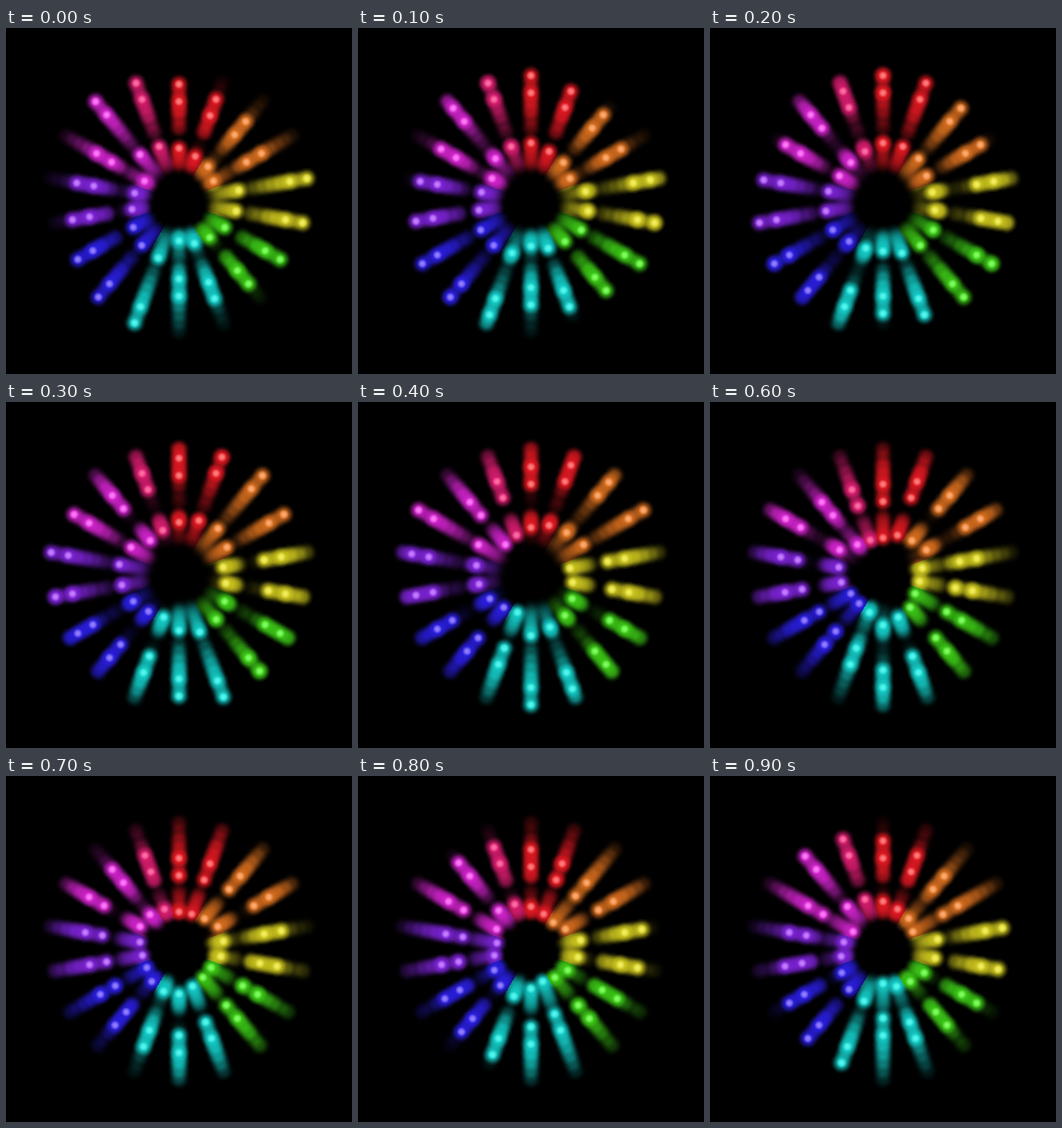
Animation of 400 by 400 pixels, one loop 1 s. Source, as an HTML page with a canvas:

```html
<!DOCTYPE html>
<html lang="en">
<head>
<meta charset="utf-8">
<title>Pulsing colour wheel</title>
<style>
  html, body { margin: 0; width: 100%; height: 100%; overflow: hidden; background: #000; }
  canvas { display: block; width: 400px; height: 400px; }
</style>
</head>
<body>
<canvas id="stage" width="400" height="400"></canvas>
<script>
const ctx = document.getElementById('stage').getContext('2d');
const LOOP = 1000, STEP = 100, SPOKES = 18, TRAIL = 7;
const TAU = Math.PI * 2;

// span in degrees, body colour, core colour; clockwise from 10 degrees before the top
const sectors = [
  [40, '225,24,34', '255,128,128'],
  [40, '215,110,30', '255,172,115'],
  [40, '205,198,30', '242,238,95'],
  [40, '60,200,22', '130,255,100'],
  [60, '20,205,200', '85,248,238'],
  [40, '42,30,225', '150,130,255'],
  [40, '125,35,215', '200,130,255'],
  [40, '210,35,205', '255,125,248'],
  [20, '215,28,110', '255,112,165']
];

const tint = ctx.createConicGradient(-100 / 360 * TAU, 200, 200);
const cores = [];
let start = 0;
for (const [span, body, core] of sectors) {
  tint.addColorStop(start / 360, `rgb(${body})`);
  tint.addColorStop((start + span) / 360, `rgb(${body})`);
  for (let a = start; a < start + span; a += 20) cores.push(core);
  start += span;
}

// Each group of six spokes shares the same staggered peak times.
const peak = k => Math.floor((k + 2) % 6 / 6 * 10) * 50;

// Triangle wave: 1 at the peak time, 0 half a loop later.
function swing(k, t) {
  const d = (t - peak(k) + 2 * LOOP) % LOOP / LOOP;
  return Math.abs(1 - 2 * d);
}

function radii(k, t) {
  const u = swing(k, t);
  return [100 + 50 * u, 80 + 50 * u, 40 + 30 * u];
}

function blob(k, r, size, rgb, stops) {
  const a = k / SPOKES * TAU;
  const x = 200 + r * Math.sin(a), y = 200 - r * Math.cos(a);
  const g = ctx.createRadialGradient(x, y, 0, x, y, size);
  for (const [p, alpha] of stops) g.addColorStop(p, `rgba(${rgb},${alpha})`);
  ctx.fillStyle = g;
  ctx.fillRect(x - size, y - size, 2 * size, 2 * size);
}

function eachDot(t, paint) {
  for (let k = 0; k < SPOKES; k++)
    for (const r of radii(k, t)) paint(k, r);
}

function draw(t) {
  ctx.globalCompositeOperation = 'source-over';
  ctx.fillStyle = '#000';
  ctx.fillRect(0, 0, 400, 400);

  ctx.globalCompositeOperation = 'lighten';
  for (let age = TRAIL; age >= 0; age--) {
    const v = age ? 0.7 * 0.72 ** (age - 1) : 1;
    const glow = [[0, v], [0.35, v * 0.88], [0.6, v * 0.45], [0.8, v * 0.14], [1, 0]];
    eachDot(t - age * STEP, (k, r) => blob(k, r, 13, '255,255,255', glow));
  }

  ctx.globalCompositeOperation = 'multiply';
  ctx.fillStyle = tint;
  ctx.fillRect(0, 0, 400, 400);

  ctx.globalCompositeOperation = 'source-over';
  const shine = [[0, 1], [0.4, 0.85], [1, 0]];
  eachDot(t, (k, r) => blob(k, r, 5.5, cores[k], shine));
}

let shown = -1;
function tick() {
  const n = Math.floor(performance.now() % LOOP / STEP);
  if (n !== shown) draw((shown = n) * STEP);
  requestAnimationFrame(tick);
}
tick();
</script>
</body>
</html>
```
